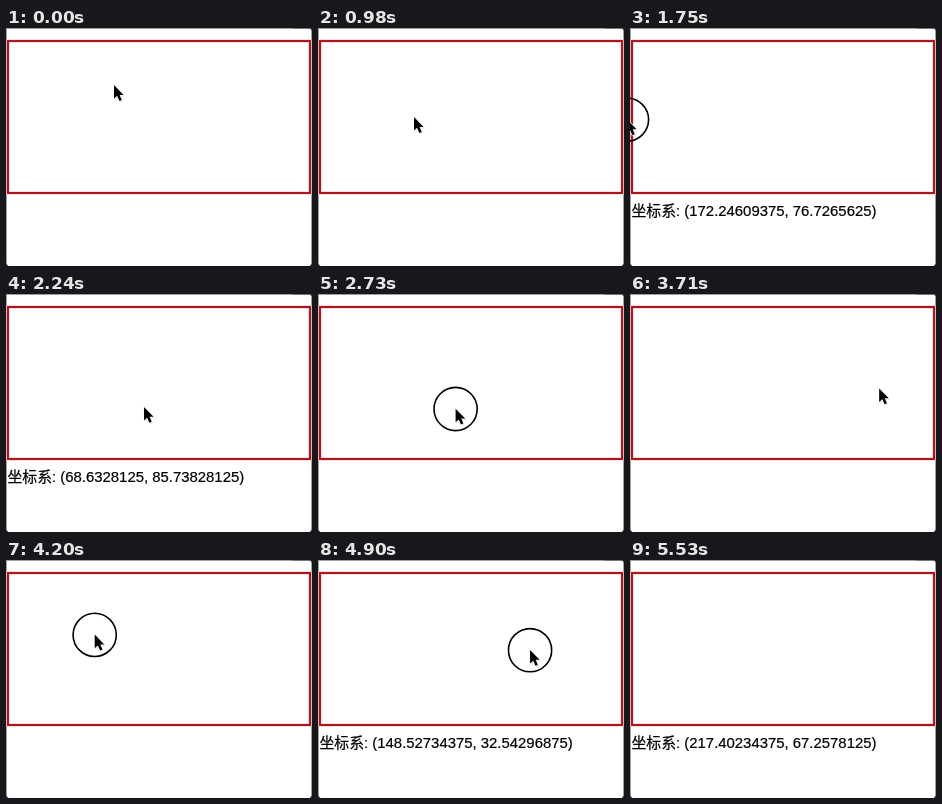
Animation of 306x238 px, one loop 5600 ms. Source, as an HTML page:

```html
<!DOCTYPE html>
<html lang="zh">
<head>
<meta charset="utf-8">
<title>Drag location</title>
<style>
  html, body { margin: 0; width: 100%; height: 100%; overflow: hidden; background: #fff; }
  svg { display: block; width: 306px; height: 238px; }
  text {
    font: 14.9px "Liberation Sans", "Noto Sans CJK SC", "Noto Sans CJK", sans-serif;
    stroke: #000; stroke-width: .2px;
  }
  .frame { fill: none; stroke: #ae151d; stroke-width: 2px; }
  .glow { fill: none; stroke: #f3c9cb; stroke-width: 4px; opacity: .6; }
</style>
</head>
<body>
<svg viewBox="0 0 306 238">
  <rect width="306" height="238" fill="#fff"/>
  <path d="M0 .5H306M.5 0V238M305.5 0V238" stroke="#a0a0a0"/>
  <path d="M286 .5H304" stroke="#777"/>
  <path d="M0 235.5L2.5 238H0ZM306 235.5L303.5 238H306ZM306 0V2.5L303.5 0Z" fill="#333"/>
  <rect class="glow" x="2" y="13" width="302" height="152"/>
  <rect class="frame" x="2" y="13" width="302" height="152"/>
  <text id="label" x="1.4" y="188"></text>
  <g id="pointer">
    <circle id="ring" cy=".3" r="21.6" fill="none" stroke="#000" stroke-width="1.6"/>
    <path d="M.5 1V15L4 12.2 6.2 17 8.8 16 6.7 11.2H10.8Z" opacity=".16"/>
    <path d="M0 0V13.6L3.1 10.8 5.4 15.9 7.8 14.9 5.6 9.9H9.6Z" stroke="#fff" stroke-width="1.4" stroke-linejoin="round" paint-order="stroke"/>
  </g>
</svg>
<script>
  const LOOP = 5600, STEP = 70, LAG = 350;

  // time, x, y where the pointer turns or rests
  const keys = [
    [0, 108, 57], [210, 189, 78], [350, 189, 78], [560, 118, 55], [800, 30, 100],
    [980, 96, 89], [1190, 96, 89], [1400, 150.24609375, 89.7265625], [1750, -3, 91.3],
    [2100, 138, 112], [2730, 137.6, 114.7], [2870, 136.078125, 115.91015625],
    [3050, 222, 75.6], [3220, 194, 80], [3430, 176, 86], [3640, 262, 96],
    [4060, 88.7, 74.6], [4200, 88.7, 74.6], [4510, 118, 43.5], [4830, 214, 91],
    [5180, 195.40234375, 80.2578125], [5320, 200, 260]
  ];
  const presses = [[1120, 2170], [2660, 3360], [4130, 5250]];

  const [label, pointer, ring] = ["label", "pointer", "ring"].map(id => document.getElementById(id));
  const pressed = t => presses.some(([down, up]) => t >= down && t < up);
  const show = (el, on) => el.setAttribute("visibility", on ? "visible" : "hidden");
  const snap = v => Math.round(v * 256) / 256;

  const slope = (i, axis) => {
    const a = keys[i], b = keys[i + 1];
    return a && b ? (b[axis] - a[axis]) / (b[0] - a[0]) : 0;
  };

  // harmonic mean: smooth through a key, still at turns and rests
  const tangent = (i, axis) => {
    const a = slope(i - 1, axis), b = slope(i, axis);
    return a * b > 0 ? 2 * a * b / (a + b) : 0;
  };

  function at(t) {
    const next = keys.findIndex(key => key[0] > t);
    if (next < 0) return keys[keys.length - 1].slice(1);
    const i = next - 1, a = keys[i], b = keys[next];
    const span = b[0] - a[0], u = (t - a[0]) / span, v = 1 - u;
    return [1, 2].map(axis =>
      a[axis] + (b[axis] - a[axis]) * u * u * (3 - 2 * u) +
      span * u * v * (v * tangent(i, axis) - u * tangent(next, axis)));
  }

  function draw(now) {
    const t = Math.floor((now % LOOP) / STEP) * STEP;
    const [x, y] = at(t);
    pointer.setAttribute("transform", `translate(${x} ${y})`);
    show(ring, pressed(t));

    // the readout trails the drag
    const then = t - LAG, reading = pressed(then);
    show(label, reading);
    if (reading) {
      const [px, py] = at(then);
      label.textContent = `坐标系: (${snap(px + 22)}, ${snap(py - 13)})`;
    }
  }

  const start = performance.now();
  function tick() {
    draw(performance.now() - start);
    requestAnimationFrame(tick);
  }
  tick();
</script>
</body>
</html>
```
